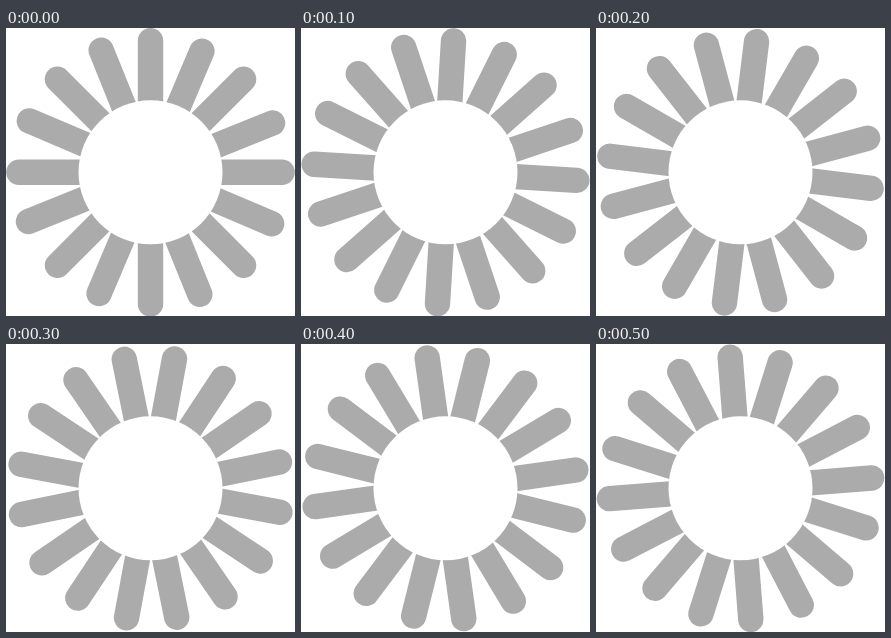
An HTML page that plays this animation: 289 by 288 pixels, repeating every 600 ms.

```html
<!DOCTYPE html>
<html lang="en">
<head>
<meta charset="utf-8">
<title>Spinner</title>
<style>
  html, body { margin: 0; width: 100%; height: 100%; overflow: hidden; background: #fff; }
  svg { display: block; width: 100%; height: 100%; }
</style>
</head>
<body>
<svg viewBox="0 0 289 288">
  <g id="wheel" stroke="#ababab" stroke-width="25.4" stroke-linecap="round"></g>
  <circle cx="144.5" cy="144.3" r="72" fill="#fff"/>
</svg>
<script>
  const SPOKES = 16, STEPS = 6, STEP_MS = 100, STEP_DEG = 3.5;
  const wheel = document.getElementById('wheel');

  // Spokes sit on whole degrees.
  wheel.innerHTML = Array.from({ length: SPOKES }, (_, i) =>
    `<path d="M0-70V-131.6" transform="rotate(${Math.round(i * 360 / SPOKES)})"/>`).join('');

  function draw(now) {
    const step = Math.floor(now / STEP_MS) % STEPS;
    wheel.setAttribute('transform', `translate(144.5 144.3) rotate(${step * STEP_DEG})`);
  }

  function tick() {
    draw(performance.now() - start);
    requestAnimationFrame(tick);
  }

  const start = performance.now();
  tick();
</script>
</body>
</html>
```
